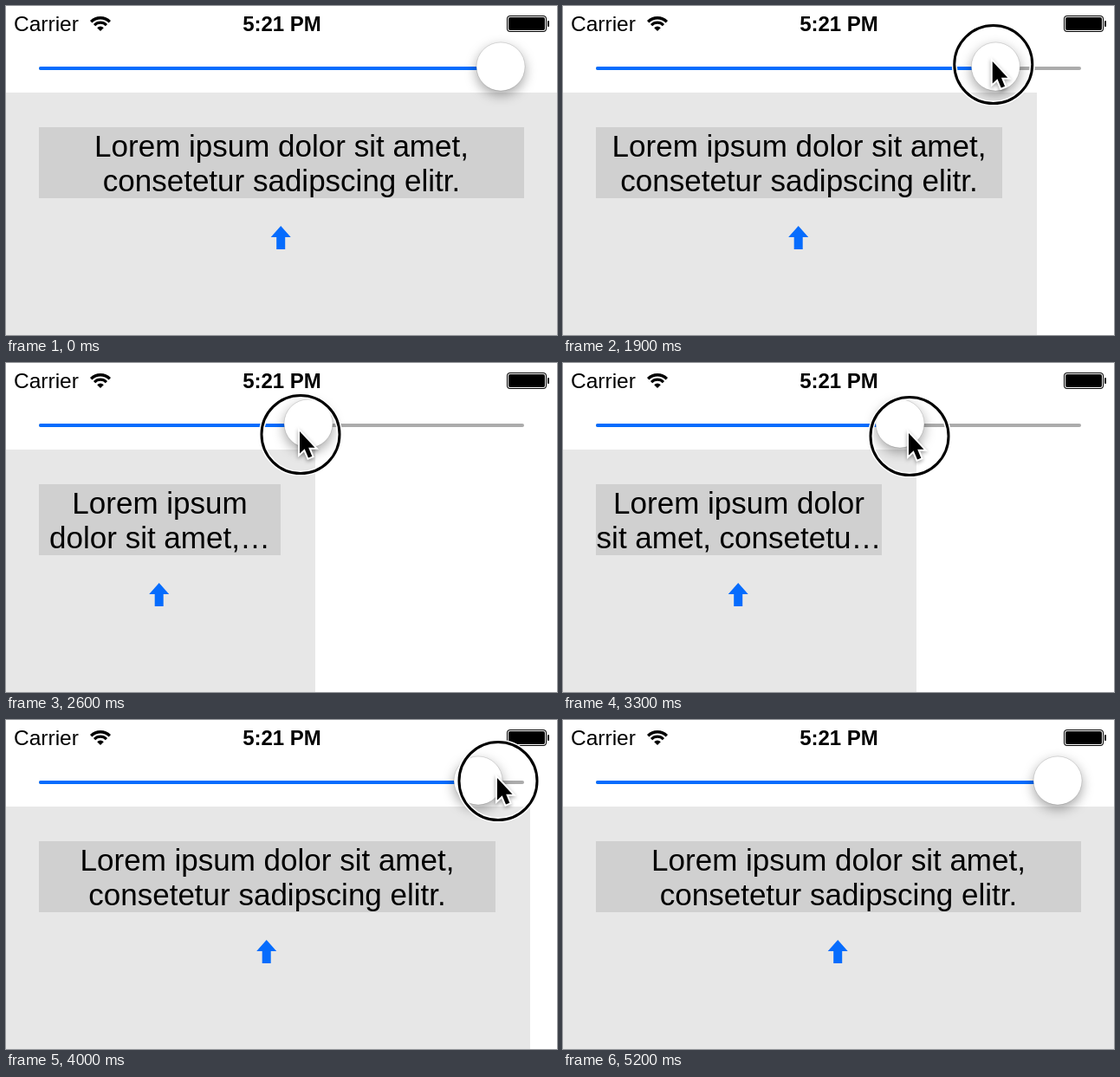
Recreate the animation shown at these times as an HTML page with a canvas. Size 636 by 380 pixels, loop 6.3 s.

```html
<!DOCTYPE html>
<html lang="en">
<head>
<meta charset="utf-8">
<title>Label width slider</title>
<style>
html, body { margin: 0; width: 100%; height: 100%; overflow: hidden; background: #fff; }
canvas { display: block; }
</style>
</head>
<body>
<canvas id="stage" width="636" height="380"></canvas>
<script>
const ctx = document.getElementById('stage').getContext('2d');
const LOOP = 6300, STEP = 100, PRESS = 1600;
const BLUE = '#066cfd', SANS = '"Liberation Sans", Arial, sans-serif';
const WORDS = 'Lorem ipsum dolor sit amet, consetetur sadipscing elitr.'.split(' ');

// time, pointer x, pointer y, thumb x
const KEYS = [
  [800, 700, 230, 571], [900, 628, 190, 571], [1500, 566, 56, 571],
  [1600, 564, 57, 571], [2200, 403, 72, 401], [2600, 339, 79, 349],
  [2900, 316, 81, 320], [3000, 316, 81, 320], [3300, 399, 81, 389],
  [3700, 525, 67, 500], [4000, 567, 67, 545], [4200, 594, 66, 571],
  [4400, 618, 65, 571], [4700, 700, 65, 571]
];

function slope(i, col) {
  const [a, b] = [KEYS[i], KEYS[i + 1]];
  return a && b ? (b[col] - a[col]) / (b[0] - a[0]) : 0;
}

// Monotone tangent: harmonic mean of the neighbouring slopes
function tangent(i, col) {
  const a = slope(i - 1, col), b = slope(i, col);
  return a * b > 0 ? 2 * a * b / (a + b) : 0;
}

function valueAt(t, col) {
  const last = KEYS.length - 1;
  if (t <= KEYS[0][0]) return KEYS[0][col];
  if (t >= KEYS[last][0]) return KEYS[last][col];
  const i = KEYS.findIndex(k => k[0] > t) - 1;
  const a = KEYS[i], b = KEYS[i + 1], d = b[0] - a[0], u = (t - a[0]) / d, v = 1 - u;
  return a[col] * v * v * (1 + 2 * u) + b[col] * u * u * (1 + 2 * v)
    + d * u * v * (tangent(i, col) * v - tangent(i + 1, col) * u);
}

function rect(color, x, y, w, h, r = 0) {
  ctx.fillStyle = color;
  ctx.beginPath();
  ctx.roundRect(x, y, w, h, r);
  ctx.fill();
}

function polygon(points, x, y) {
  ctx.beginPath();
  for (const [px, py] of points) ctx.lineTo(x + px, y + py);
  ctx.closePath();
}

function ring(x, y, r, width, color, from = 0, to = Math.PI * 2) {
  ctx.beginPath();
  ctx.arc(x, y, r, from, to);
  ctx.lineWidth = width;
  ctx.strokeStyle = color;
  ctx.stroke();
}

function text(str, font, x, y, align) {
  ctx.fillStyle = '#000';
  ctx.font = `${font} ${SANS}`;
  ctx.textAlign = align;
  ctx.fillText(str, x, y);
}

function shadow(color, blur, y) {
  ctx.shadowColor = color;
  ctx.shadowBlur = blur;
  ctx.shadowOffsetY = y;
}

// Two lines, the second cut off with an ellipsis
function wrap(width) {
  ctx.font = `35px ${SANS}`;
  const fits = s => ctx.measureText(s).width <= width + 1;
  let n = 1;
  while (n < WORDS.length && fits(WORDS.slice(0, n + 1).join(' '))) n++;
  let rest = WORDS.slice(n).join(' ');
  if (!fits(rest)) {
    while (rest && !fits(rest + '…')) rest = rest.slice(0, -1);
    rest = rest.trimEnd() + '…';
  }
  return [WORDS.slice(0, n).join(' '), rest];
}

function drawStatusBar() {
  text('Carrier', '24.5px', 9, 29, 'left');
  text('5:21 PM', 'bold 24px', 318.5, 29, 'center');
  const from = -Math.PI * 3 / 4, to = -Math.PI / 4;
  ring(109, 29, 15.3, 3.4, '#000', from, to);
  ring(109, 29, 9.8, 3.2, '#000', from, to);
  ring(109, 29, 2.7, 5.4, '#000', from, to);
  rect('#000', 578, 11, 46, 19, 4);
  rect('#fff', 579, 12, 44, 17, 3);
  rect('#000', 580, 13, 42, 15, 2);
  rect('#000', 625, 17, 2, 7, 1);
}

function drawPanel(thumb) {
  const right = Math.round(638 - (571 - thumb) * 1.265);
  const width = right - 78, middle = 38 + width / 2;
  rect('#e7e7e7', 0, 100, right, 280);
  rect('#d0d0d0', 38, 140, width, 82);
  wrap(width).forEach((line, i) => text(line, '35px', middle, 174 + 40 * i, 'center'));
  polygon([[0, 0], [11.5, 13], [5, 13], [5, 27], [-5, 27], [-5, 13], [-11.5, 13]], middle - 0.8, 254);
  ctx.fillStyle = BLUE;
  ctx.fill();
}

function drawSlider(thumb) {
  rect('#acacac', 38, 70, 560, 4, 2);
  rect(BLUE, 38, 70, thumb - 38, 4, 2);
  ctx.save();
  shadow('rgba(0,0,0,.36)', 14, 5);
  rect('#fff', thumb - 28, 42, 56, 56, 28);
  ctx.restore();
  ring(thumb, 70, 28, 1, 'rgba(0,0,0,.13)');
}

function drawPointer(x, y, pressed) {
  if (pressed) {
    ring(x + 1, y + 3.5, 45, 6, '#fff');
    ring(x + 1, y + 3.5, 45, 3, '#000');
  }
  polygon([[0, 0], [0, 25.5], [5.7, 20.3], [10, 30.5], [14.3, 28.7], [10.2, 18.7], [17.5, 18.7]], x, y);
  ctx.save();
  shadow('rgba(0,0,0,.35)', 4, 2);
  ctx.lineWidth = 4;
  ctx.strokeStyle = '#fff';
  ctx.stroke();
  ctx.restore();
  ctx.fillStyle = '#000';
  ctx.fill();
}

function frame(now) {
  const t = Math.floor(now % LOOP / STEP) * STEP;
  const thumb = valueAt(t, 3);
  rect('#fff', 0, 0, 636, 380);
  drawPanel(thumb);
  drawStatusBar();
  drawSlider(thumb);
  drawPointer(valueAt(t, 1), valueAt(t, 2), t >= PRESS);
  requestAnimationFrame(frame);
}
frame(performance.now());
</script>
</body>
</html>
```
